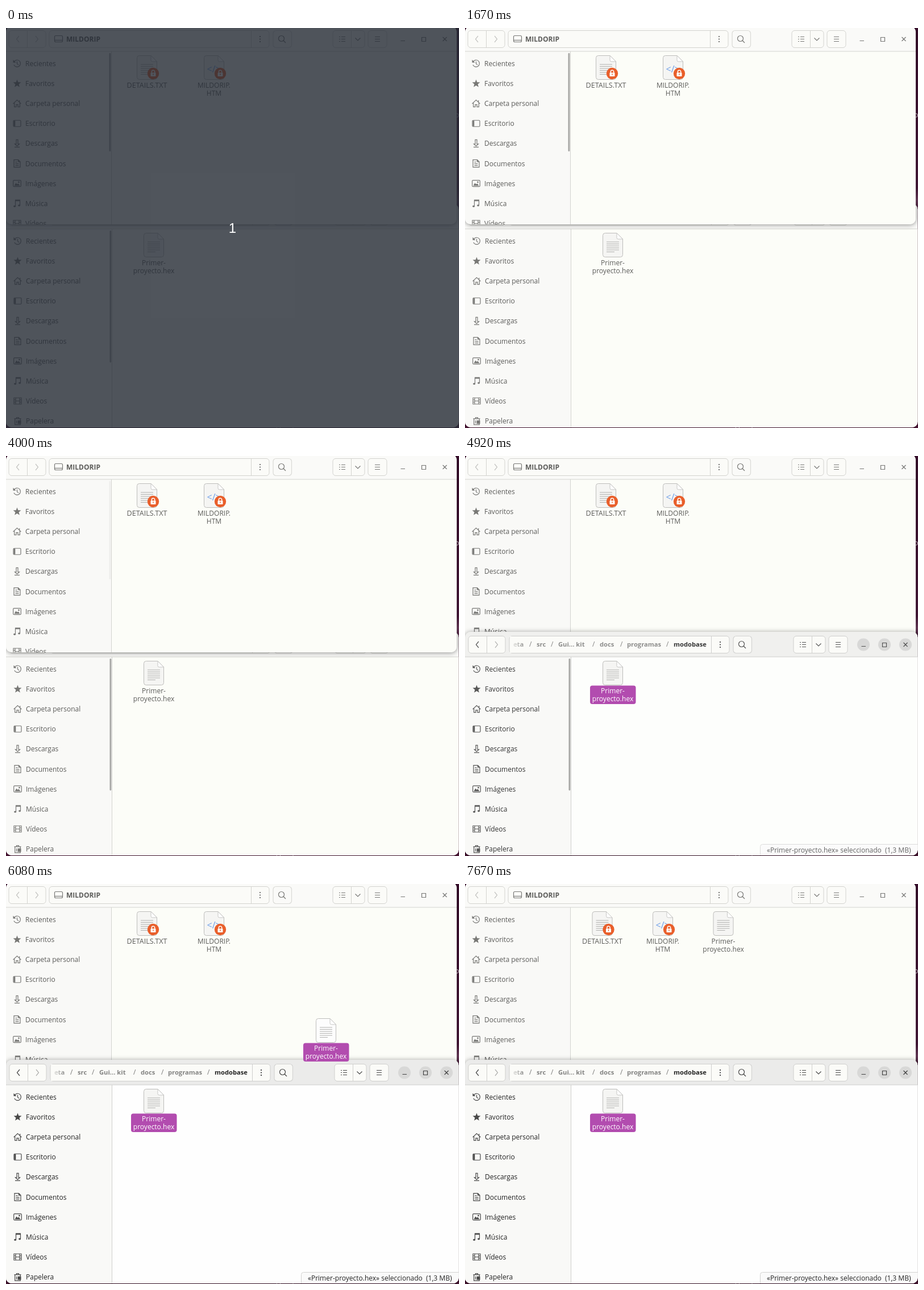
Write an HTML page that moves like this. It is 797x703 px and loops after 8 s.

```html
<!DOCTYPE html>
<html lang="es">
<head>
<meta charset="utf-8">
<title>Copiar un archivo</title>
<style>
html, body { margin: 0; width: 100%; height: 100%; overflow: hidden; background: #3a0f2e; }
svg { display: block; width: 797px; height: 703px; font: 12px "Open Sans", "Noto Sans", sans-serif; }
text { fill: currentColor; white-space: pre; }
.win { color: #5c5c5a; --btn: #fbfbf8; --line: #d3d3cf; }
.head { fill: #fafaf8; }
.side { fill: #f9f9f7; }
.body { fill: #fcfdf8; }
.btn { fill: var(--btn); stroke: var(--line); }
.rule { stroke: var(--line); fill: none; }
.ico { fill: none; stroke: currentColor; stroke-width: 1.2; opacity: .82; }
.ico .f { fill: currentColor; stroke: none; }
.bold { font-weight: 700; font-size: 11.2px; }
.mid { text-anchor: middle; }
.off { opacity: .35; }
.shadow { filter: drop-shadow(0 1px 4px rgba(0,0,0,.42)); }

.barA, .barB, .trough, .show, .old, .new, .ghost, .veil { animation: 8s step-end infinite; }
.barA { animation-name: barA; }
.barB { animation-name: barB; }
.trough { animation-name: trough; }
.show { animation-name: show; }
.old { animation-name: old; }
.new { animation-name: new; }
.ghost { animation-name: drag; }
.veil { animation-name: veil; }
.awake { animation: wake 8s linear infinite; --line: #cfcfcd; }
.awake .head { animation: wakeHead 8s linear infinite; }
.awake .body { animation: wakeBody 8s linear infinite; }
.fade { animation: fade 8s linear infinite; }

@keyframes veil { 0% { opacity: 1 } 1%, 100% { opacity: 0 } }
@keyframes barA {
  0% { opacity: 1 } 8.375% { opacity: .75 } 9.375% { opacity: .5 } 10.375% { opacity: .25 }
  12.5% { opacity: 0 } 17.75% { opacity: .5 } 20.875% { opacity: 1 }
  45.875% { opacity: .7 } 47.875% { opacity: .35 } 50% { opacity: .12 } 59.375%, 100% { opacity: 0 }
}
@keyframes barB {
  0% { opacity: 1 } 8.375% { opacity: .75 } 9.375% { opacity: .5 } 10.375% { opacity: .25 }
  12.5% { opacity: 0 } 36.5% { opacity: 1 } 64.625% { opacity: .5 } 67.75%, 100% { opacity: 0 }
}
@keyframes trough { 0% { opacity: 0 } 38.5% { opacity: 1 } 39.625%, 100% { opacity: 0 } }
@keyframes show { 0% { visibility: hidden } 59.375%, 100% { visibility: visible } }
@keyframes wake { 0%, 59.375% { color: #5c5c5a } 62.5%, 100% { color: #222 } }
@keyframes wakeHead { 0%, 59.375% { fill: #fafaf8 } 62.5%, 100% { fill: #ebebea } }
@keyframes wakeBody { 0%, 59.375% { fill: #fcfdf8 } 62.5%, 100% { fill: #fefefe } }
@keyframes fade { 0%, 59.375% { opacity: .25 } 62.5%, 100% { opacity: 1 } }
@keyframes old { 0% { visibility: visible } 95.875%, 100% { visibility: hidden } }
@keyframes new { 0% { visibility: hidden } 95.875%, 100% { visibility: visible } }
@keyframes drag {
  0% { visibility: hidden; transform: translate(220px, 360px) }
  67.75% { visibility: visible; transform: translate(230px, 372px) }
  68.75% { transform: translate(274px, 428px) }
  69.875% { transform: translate(336px, 476px) }
  70.875% { transform: translate(406px, 503px) }
  71.875% { transform: translate(478px, 500px) }
  72.875% { transform: translate(530px, 455px) }
  74% { transform: translate(552px, 388px) }
  75% { transform: translate(547px, 310px) }
  76% { transform: translate(523px, 236px) }
  77.125% { transform: translate(494px, 172px) }
  78.125% { transform: translate(470px, 146px) }
  79.125% { transform: translate(455px, 135px) }
  80.25% { transform: translate(448px, 131px) }
  81.25% { visibility: visible; transform: translate(445px, 130px) }
  93.75%, 100% { visibility: hidden; transform: translate(445px, 130px) }
}
</style>
</head>
<body>
<svg id="stage" viewBox="0 0 797 703"></svg>
<script>
const DRIVE = 'MILDORIP';

// Sidebar rows: label and a 16px icon centred on the origin
const places = [
  ['Recientes', '<path d="M-5.2-3.2A6 6 0 1 1-5.6 2.4M0-3.5V.5L2.6 2.6"/><path class="f" d="M-7-6.5V-1.5H-2Z"/>'],
  ['Favoritos', '<path class="f" d="M0-7 1.8-2.2 7-2 3 1.3 4.4 6.4 0 3.5-4.4 6.4-3 1.3-7-2-1.8-2.2Z"/>'],
  ['Carpeta personal', '<path d="M-7 .5 0-6 7 .5M-4.8-1V6H-1.5V2H1.5V6H4.8V-1M4.2-5.5V-2.5"/>'],
  ['Escritorio', '<rect x="-6.5" y="-5.5" width="13" height="11" rx="1.5"/><path class="f" d="M-6-5H-3.2V5H-6Z"/>'],
  ['Descargas', '<path d="M-1.5-6.5H1.5V1H4L0 4.6-4 1H-1.5ZM-4.5 6.5H4.5"/>'],
  ['Documentos', '<path d="M-5.5-6.5H2L5.5-3V6.5H-5.5ZM2-6.5V-3H5.5M-3-2.5H0M-3 .5H3M-3 3.5H3"/>'],
  ['Imágenes', '<rect x="-6.8" y="-5.5" width="13.6" height="11" rx="1.5"/><path class="f" d="M-5 4-2-1 0 1.5 2 0 5 4Z"/><circle class="f" cx="3" cy="-2.4" r="1.4"/>'],
  ['Música', '<path d="M-3 4.5V-6H5V3"/><path class="f" d="M-3-6.5H5.5V-4H-3Z"/><ellipse class="f" cx="-4.4" cy="5" rx="2" ry="1.7"/><ellipse class="f" cx="3.6" cy="3.5" rx="2" ry="1.7"/>'],
  ['Vídeos', '<path d="M-6.5-5.5H6.5V5.5H-6.5ZM-3.5-5.5V5.5M3.5-5.5V5.5M-3.5 0H3.5M-6.5-2H-3.5M-6.5 2H-3.5M3.5-2H6.5M3.5 2H6.5"/>'],
  ['Papelera', '<path d="M-6-4H6M-2-4V-6H2V-4M-4.8-4V6.5H4.8V-4M-2-1V4"/><path class="f" d="M0-1H6V5H0Z"/>']
];

const at = (x, y, s, cls = '') => `<g class="${cls}" transform="translate(${x} ${y})">${s}</g>`;
const text = (x, y, s, cls = '', extra = '') => `<text x="${x}" y="${y}" class="${cls}" ${extra}>${s}</text>`;
const box = (x, y, w, h, cls, r = 0, extra = '') =>
  `<rect x="${x}" y="${y}" width="${w}" height="${h}" rx="${r}" class="${cls}" ${extra}/>`;
const path = (d, cls) => `<path d="${d}" class="${cls}"/>`;

function sheet(kind, fill) {
  const lines = [16, 19.5, 23, 26.5, 30, 33.5].map((y, i) => `M7 ${y}H${i == 5 ? 21 : 29}`).join('');
  const code = '<text x="5.5" y="30" style="fill:#6f9fe8;font-size:16px">&lt;/&gt;</text>';
  return `<path d="M4.5.5H25L35.5 11V38.5a4 4 0 0 1-4 4H4.5a4 4 0 0 1-4-4V4.5a4 4 0 0 1 4-4Z" fill="${fill}" stroke="#bdbdbb"/>
    <path d="M25 .5V8.500a2.500 2.500 0 0 0 2.500 2.500H35.500Z" fill="#fff" stroke="#c6c6c4"/>` +
    (kind == 'code' ? code : `<path d="${lines}" stroke="#b0b0ae" stroke-width="1.2"/>`);
}

const lock = at(29, 32, `<circle r="10.200" fill="#e95f2b"/>
  <rect x="-4.500" y="-1.500" width="9" height="6.500" rx="1" fill="#fff"/>
  <path d="M-2.700-1V-3a2.700 2.700 0 0 1 5.400 0V-1" fill="none" stroke="#fff" stroke-width="1.500"/>
  <rect x="-.600" y="0" width="1.200" height="3" fill="#e95f2b"/>`);

// File with its icon top at y and centre at x
function file(x, y, names, { kind, locked, picked, fill = '#f5f5f3', size = 12 } = {}) {
  const label = names.map((n, i) => text(0, 56.5 + 14.7 * i, n, 'mid',
    `style="font-size:${size}px${picked ? ';fill:#fff' : ''}"`)).join('');
  return at(x, y, at(-18, 0, sheet(kind, fill) + (locked ? lock : '')) +
    (picked ? box(-40, 43.5, 80.5, 32.5, '', 4, 'fill="#b24caf"') : '') + label);
}
const hexNames = ['Primer-', 'proyecto.hex'];
const driveFiles = (a, b) =>
  file(a, 48, ['DETAILS.TXT'], { locked: true, size: 12.6 }) +
  file(b, 48, [DRIVE + '.', 'HTM'], { kind: 'code', locked: true });

const crumbs = [[85, 'eta'], [126, 'src'], [164, 'Gui... kit'], [237, 'docs'], [285, 'programas']]
  .map(([x, s]) => text(x - 1, 23, s, 'bold', 'opacity=".55"')).join('') +
  [115, 153, 226, 275, 356].map(x => text(x - 3, 23, '/', '', 'opacity=".6"')).join('') +
  text(366, 23, 'modobase', 'bold') +
  '<rect x="78" y="5" width="26" height="29" fill="url(#dim)"/>';

const driveTitle = '<g class="ico"><rect x="85.500" y="13.500" width="14" height="11" rx="2"/><path d="M86 21.500H99"/></g>' +
  text(106, 24, DRIVE, 'bold', 'style="font-size:12px"');

function header(m, r, title, back, awake) {
  const disc = awake ? [698, 735, 772].map(x => `<circle cx="${x + r}" cy="19.500" r="11" fill="#d8d8d7"/>`).join('') : '';
  return box(5, 4.5, 65, 30, 'btn', 5) + path('M37.500 5V34', 'rule') +
    path('M23 14 18.500 19.500 23 25', back ? 'ico' : 'ico off') + path('M52 14 56.500 19.500 52 25', 'ico off') +
    box(76 + m, 4.5, 387, 30, 'btn', 5) + path(`M${431.5 + m} 5V34`, 'rule') + title +
    at(m, 0, '<path class="f" d="M446 14h2v2h-2ZM446 18.500h2v2h-2ZM446 23h2v2h-2Z"/>' +
      box(470, 4.5, 32.5, 30, 'btn', 5) + '<circle cx="484.500" cy="18.500" r="5"/><path d="M488 22 492 26"/>', 'ico') +
    at(r, 0, box(575, 4.5, 56, 30, 'btn', 5) + path('M607.500 5V34', 'rule') + box(637, 4.5, 33, 30, 'btn', 5) +
      '<g class="ico"><path d="M590 15.500H597M590 19.500H597M590 23.500H597M586 15.500H588M586 19.500H588M586 23.500H588M614.500 17.500 619 22 623.500 17.500M649 15.500H658M649 19.500H658M649 23.500H658"/></g>') +
    disc + at(r, 0, '<path d="M694.500 22.500H702M731.500 16.500H738.500V23.500H731.500ZM768.500 16 775.500 23M775.500 16 768.500 23"/>', 'ico');
}

function win({ x, y, w, h, m = 0, r = 0, clip, title, back, awake, bar, barH, files }) {
  const rows = places.map(([name, icon], i) =>
    at(19.5, 62.3 + 35.15 * i, icon, 'ico') + text(34, 66.8 + 35.15 * i, name)).join('');
  const trough = bar == 'barB' ? `<g class="trough">${box(174, 41.5, 10.5, 350, '', 0, 'fill="#efefec"')}${box(177, 44, 6.5, barH, '', 3, 'fill="#a6a6a4"')}</g>` : '';
  return at(x, y, box(-x, -3, w, h + 3, 'head shadow', 10) +
    `<g clip-path="url(#${clip})">` +
    box(-x, -3, w, 44, 'head') + box(-x, 41, 186, h, 'side') + box(185, 41, w, h, 'body') +
    path(`M-2 41H${w}`, 'rule') + path(`M185.500 41V${h}`, 'rule') +
    header(m, r, title, back, awake) + rows + trough +
    box(181.5, 44, 2.8, barH, bar, 1.4, 'fill="#a6a6a4"') + files + '</g>', 'win' + (awake ? ' awake' : ''));
}

const low = { x: 1, y: 312, w: 796.5, h: 390, m: 1, r: 2, clip: 'lowClip', back: true, bar: 'barB', barH: 232, title: crumbs };
const hexFile = picked => file(259, 48, hexNames, { picked });
const status = `<g class="fade">
  <path d="M518.500 391V374.500a4 4 0 0 1 4-4H800V391Z" fill="#fafafa" stroke="#d2d2d0"/>
  ${text(530, 384.5, '«Primer-proyecto.hex» seleccionado  (1,3 MB)')}</g>`;

document.getElementById('stage').innerHTML = `
  <defs>
    <clipPath id="topClip"><rect x="0" y="-3" width="793" height="348" rx="10"/></clipPath>
    <clipPath id="lowClip"><rect x="-1" y="-3" width="796.500" height="393" rx="10"/></clipPath>
    <linearGradient id="dim"><stop stop-color="#fbfbf8"/><stop offset="1" stop-color="#fbfbf8" stop-opacity="0"/></linearGradient>
    <linearGradient id="desk" x2="0" y2="1">
      <stop stop-color="#3a0f2e"/><stop offset=".4" stop-color="#4a1a3c"/>
      <stop offset=".43" stop-color="#704060"/><stop offset=".47" stop-color="#48183a"/><stop offset="1" stop-color="#4f1738"/>
    </linearGradient>
  </defs>
  <rect width="797" height="703" fill="url(#desk)"/>
  <g color="#e4dce2">${text(790, 157, 'o')}${text(460, 711, 'uni local')}</g>
  ${win({ ...low, files: hexFile(false) })}
  ${win({ x: 0, y: 0, w: 793, h: 345, clip: 'topClip', title: driveTitle, bar: 'barA', barH: 173,
    files: `<g class="old">${driveFiles(248, 366)}</g>
      <g class="new">${driveFiles(241.5, 348)}${file(454.5, 48, hexNames)}</g>` })}
  <g class="show">${win({ ...low, awake: true, files: hexFile(true) + status })}</g>
  <g class="ghost">${file(40, 0, hexNames, { picked: true, fill: '#fdfdfd' })}</g>
  <g class="veil">
    <rect width="797" height="703" fill="#252b35" fill-opacity=".8"/>
    <text x="398.500" y="360" class="mid" style="font:24px 'Liberation Sans',Arial,sans-serif;fill:#fff">1</text>
  </g>`;
</script>
</body>
</html>
```
